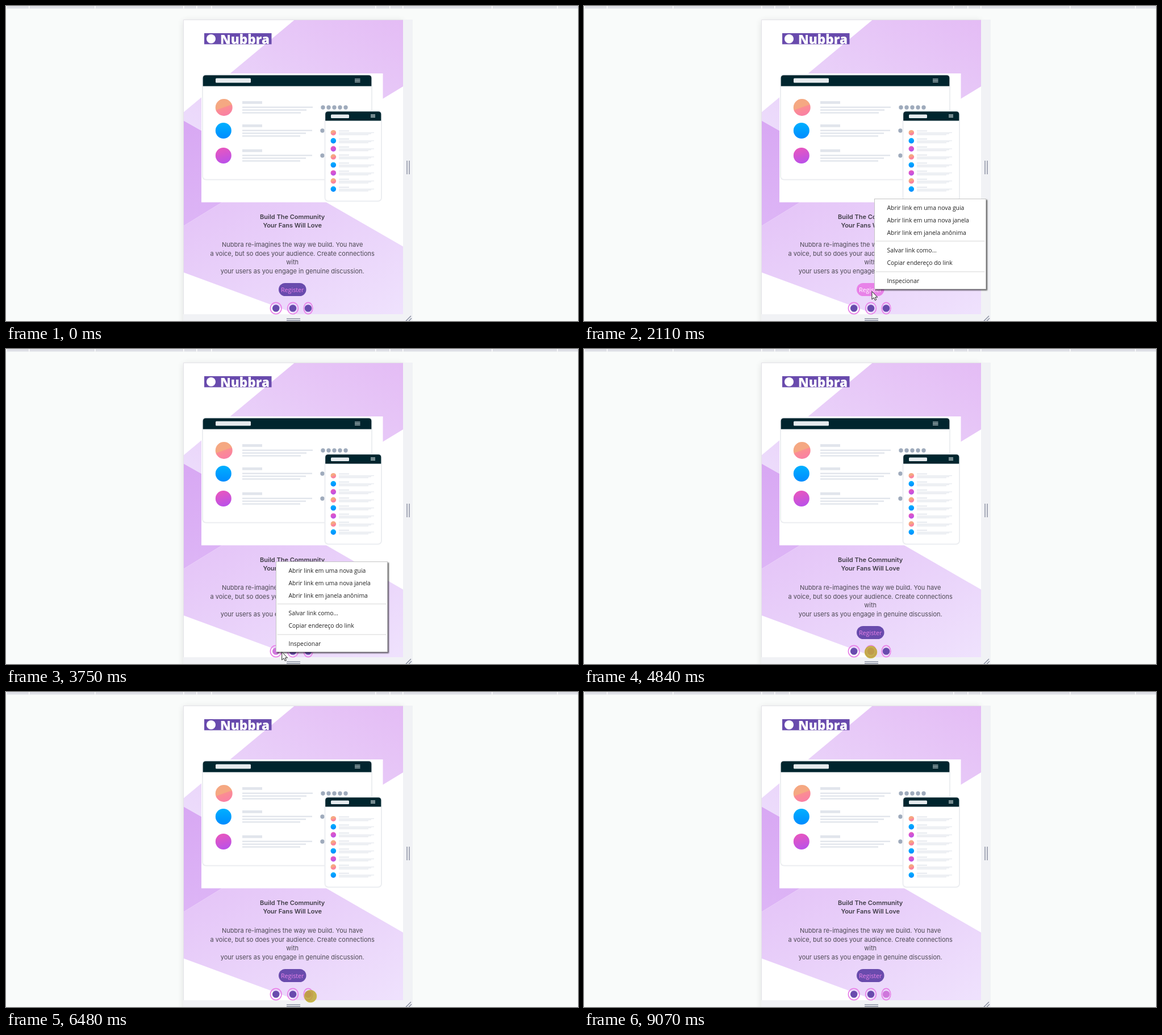
Write an HTML page that moves like this. It is 1007 by 556 pixels and loops after 9.27 s.

```html
<!DOCTYPE html>
<html lang="en">
<head>
<meta charset="utf-8">
<style>
  html, body { margin: 0; width: 100%; height: 100%; overflow: hidden; background: #f9fbfa; }
  svg { display: block; }
  .body { font: 11px Inter, sans-serif; fill: #4d4954; text-anchor: middle; }
  .bold { font-weight: 600; fill: #3f3c46; }
  .item { font: 10.4px "Open Sans", sans-serif; fill: #222; }
</style>
</head>
<body>
<svg width="1007" height="556" viewBox="0 0 1007 556">
  <defs>
    <linearGradient id="top" x1="0" y1="1" x2="1" y2="0"><stop stop-color="#eddffc"/><stop offset="1" stop-color="#e4bcf5"/></linearGradient>
    <linearGradient id="side" x1="0" y1="0" x2="0" y2="1"><stop stop-color="#d8a8f3"/><stop offset="1" stop-color="#ddb5f6"/></linearGradient>
    <linearGradient id="low" x1="0" y1="0" x2="1" y2="1"><stop stop-color="#e4c3f7"/><stop offset="1" stop-color="#efe2fd"/></linearGradient>
    <linearGradient id="orange" x1=".3" y1="0" x2=".65" y2="1"><stop offset=".48" stop-color="#f5a882"/><stop offset=".52" stop-color="#fb8d92"/><stop offset="1" stop-color="#f97fa6"/></linearGradient>
    <linearGradient id="blue" x2="0" y2="1"><stop stop-color="#00b0ff"/><stop offset="1" stop-color="#008cff"/></linearGradient>
    <linearGradient id="pink" x1=".3" y1="0" x2=".6" y2="1"><stop stop-color="#e957bd"/><stop offset="1" stop-color="#b951ea"/></linearGradient>
    <filter id="soft" x="-10%" y="-10%" width="120%" height="120%"><feGaussianBlur stdDeviation="6"/></filter>
    <filter id="drop" x="-5%" y="-5%" width="110%" height="110%"><feDropShadow dx="2" dy="2" stdDeviation="1" flood-opacity=".6"/></filter>
  </defs>

  <rect width="1007" height="556" fill="#f9fbfa"/>
  <g id="ruler"><rect width="1007" height="4.5" fill="#dedfe6"/></g>
  <rect x="312" y="26" width="387" height="540" opacity=".1" filter="url(#soft)"/>
  <rect x="312" y="24" width="404" height="532" fill="#f1f2f5"/>
  <rect x="312" y="24" width="387" height="520" fill="#fff"/>
  <path d="M706 273v24M710 273v24M494 552h24M494 555.3h24M704 556l9-9M709 556l5-5" stroke="#8d93a4" stroke-width="1.5"/>

  <path d="M312 188L508.500 24H699V142L520 251L344 220L312 202Z" fill="url(#top)"/>
  <path d="M312 202L480 297L381 346L312 388.500Z" fill="url(#side)"/>
  <path d="M312 388.500L381 346H563L699 424.500V544H512L312 470Z" fill="url(#low)"/>
  <path d="M312.500 24V544M312 24.500H699" stroke="#e4e2e8" fill="none"/>

  <rect x="349" y="48" width="118.500" height="19.500" fill="#694bad"/>
  <circle cx="361" cy="58" r="8" fill="#fff"/>
  <text x="377" y="66.700" font-family="Open Sans, sans-serif" font-weight="800" font-size="22.500" fill="#fff">Nubbra</text>

  <g id="art"><rect x="344" y="119" width="319.500" height="227.500" fill="#fff"/></g>

  <g class="body">
    <g class="bold"><text x="504.200" y="375.500">Build The Community</text><text x="504.200" y="391">Your Fans Will Love</text></g>
    <text x="504.200" y="425">Nubbra re-imagines the way we build. You have</text>
    <text x="504.200" y="440.500">a voice, but so does your audience. Create connections</text>
    <text x="504.200" y="456">with</text>
    <text x="504.200" y="471.500">your users as you engage in genuine discussion.</text>
  </g>

  <rect id="pill" x="480" y="489" width="48.500" height="23" rx="11.500"/>
  <text id="label" x="504.200" y="505" text-anchor="middle" font-family="Open Sans, sans-serif" font-size="10.700">Register</text>
  <rect id="tap" x="480" y="489" width="48.500" height="23" fill="#4aa3e6" opacity=".5"/>
  <g id="icons"></g>

  <g id="menu">
    <rect width="196" height="159" fill="#fff" stroke="#c4c4c4" filter="url(#drop)"/>
    <rect id="row" x="1" width="194" height="22" fill="#e8e8e8"/>
    <path d="M2 74.500H194M2 128.500H194" stroke="#d5d5d5"/>
  </g>

  <circle id="touch" r="10.800"/>
  <path id="arrow" d="M.5.5V14.500L3.800 11.500L6 16.200L8.200 15.200L6.100 10.700H10.300Z" fill="#fff" stroke="#222"/>
</svg>

<script>
const LOOP = 9270, PURPLE = [105, 75, 173], VIOLET = [232, 130, 232], WHITE = [255, 255, 255];
const $ = id => document.getElementById(id);
const add = (id, markup) => $(id).insertAdjacentHTML('beforeend', markup);
const rect = (x, y, w, h, fill, extra = '') => `<rect x="${x}" y="${y}" width="${w}" height="${h}" fill="${fill}" ${extra}/>`;
const dot = (x, y, r, fill) => `<circle cx="${x}" cy="${y}" r="${r}" fill="${fill}"/>`;
const SKINS = ['url(#orange)', 'url(#blue)', 'url(#pink)'];

for (const x of [0, 40, 156, 312, 335, 361, 650, 675, 698, 855, 970]) add('ruler', rect(x, 0, 1.5, 4.5, '#fff'));

// Rounded app window with a dark header inside its border, a title pill and a hamburger.
function appWindow(x, y, w, h, head, pill, burger) {
  const step = head / 8, edge = .7;
  return rect(x, y, w, h, '#fff', 'rx="6" stroke="#eceef1" stroke-width="2"') +
    `<path d="M${x + edge} ${y + head}V${y + 5 + edge}q0-5 5-5H${x + w - 5 - edge}q5 0 5 5V${y + head}Z" fill="#00252e"/>` +
    rect(...pill, '#e6ebee', 'rx="1.5"') +
    [-1, 0, 1].map(i => rect(burger[0], y + head / 2 + i * step - .5, burger[1], 1.1, '#dfe6e8')).join('');
}

add('art', appWindow(346, 121.5, 298, 185, 20, [369, 127.5, 62, 8], [614, 9.5]));
[179, 220, 264].forEach((y, i) => {
  add('art', dot(i ? 382.8 : 383.7, y, i ? 14 : 15, SKINS[i]) + rect(416, y - 11, 35, 4.8, '#e1e5ec') +
    [124, 113, 103].map((w, k) => rect(416, y - 1.5 + k * 4.9, w - (i ? 1 : 0), 2.4, '#e1e5ec')).join(''));
  for (let k = 0; k < (i ? 1 : 5); k++) add('art', dot((i ? 557 : 558) + k * 10, y, 3.7, '#9fabbc'));
});
add('art', appWindow(561.5, 185.5, 99.5, 159, 17, [572, 191.5, 32, 6.5], [642, 8]));
for (let i = 0; i < 8; i++) {
  const y = 223.7 + i * 14.2;
  add('art', dot(576.3, y, 4.8, SKINS[i % 3]) + rect(586, y - 4, 18, 1.6, '#e1e5ec') +
    [62, 57, 52].map((w, k) => rect(586, y - .5 + k * 1.8, w, .9, '#dde1e9')).join(''));
}

const icons = [
  { x: 475.2, rx: 9.8, on: [3270, 3340], off: [4360, 4570] },
  { x: 505, rx: 9.4, on: [4770, 4840], off: [5930, 6140] },
  { x: 532, rx: 7.8, on: [6410, 6480], off: [LOOP, LOOP + 1] },
];
for (const icon of icons) {
  add('icons', `<ellipse cx="${icon.x}" cy="533.5" rx="${icon.rx}" ry="10.2" fill="none" stroke="#e882e8" stroke-width="1.7"/>` +
    dot(icon.x, 533.5, 6.3, ''));
  icon.mark = $('icons').lastElementChild;
}

const items = [['Abrir link em uma nova guia', 16], ['Abrir link em uma nova janela', 38], ['Abrir link em janela anônima', 60],
  ['Salvar link como...', 91], ['Copiar endereço do link', 113], ['Inspecionar', 145]];
for (const [text, y] of items) add('menu', `<text class="item" x="22" y="${y + 3.7}">${text}</text>`);

// Opening time, closing time, and the pressed point at the menu's lower left corner.
const menus = [[2040, 2650, 511, 499], [3540, 4160, 475, 534], [5040, 5900, 505, 535], [6680, 9070, 536, 537]];
const presses = [[1090, 2040], [2650, 3540], [4360, 5040], [5900, 6680]];
const path = [[130, 797, 518], [400, 700, 486], [700, 585, 484], [1020, 510, 499], [1090, 511, 499], [2040, 511, 499],
  [2600, 475, 533], [3540, 475, 534], [4160, 505, 535], [5040, 505, 535], [5860, 536, 537], [6680, 536, 537],
  [7370, 723, 516], [7580, 792, 526], [8140, 958, 540]];

const within = (t, [a, b]) => t >= a && t < b;
const ramp = (t, [a, b]) => Math.min(1, Math.max(0, (t - a) / (b - a)));
const mix = (a, b, k) => `rgb(${a.map((v, i) => Math.round(v + (b[i] - v) * k))})`;
const hover = (t, on, off) => ramp(t, on) - ramp(t, off);
const show = (id, visible) => $(id).style.display = visible ? '' : 'none';
const place = (id, x, y) => $(id).setAttribute('transform', `translate(${x} ${y})`);

function pointer(t) {
  const i = Math.max(1, path.findIndex(p => p[0] > t));
  const [a, b] = t >= path.at(-1)[0] ? path.slice(-2) : [path[i - 1], path[i]];
  const k = ramp(t, [a[0], b[0]]);
  return [a[1] + (b[1] - a[1]) * k, a[2] + (b[2] - a[2]) * k];
}

function draw(t) {
  const glow = hover(t, [1300, 1500], [2920, 3060]);
  $('pill').setAttribute('fill', mix(PURPLE, VIOLET, glow));
  $('label').setAttribute('fill', mix(VIOLET, WHITE, glow));
  show('tap', within(t, [1290, 1700]));
  for (const { mark, on, off } of icons) mark.setAttribute('fill', mix(PURPLE, VIOLET, hover(t, on, off) * .8));

  const [x, y] = pointer(t);
  const menu = menus.find(m => within(t, m));
  show('menu', menu);
  if (menu) {
    const left = menu[2] + .5, top = menu[3] - 158.5;
    place('menu', left, top);
    const item = x >= left && x < left + 196 && items.find(([, c]) => Math.abs(y - top - c) < 11);
    show('row', item);
    if (item) $('row').setAttribute('y', item[1] - 11);
  }

  const visible = within(t, [130, 8210]);
  const touching = !menu && x > 312 && x < 699;
  const pressed = presses.some(p => within(t, p));
  show('touch', visible && touching);
  show('arrow', visible && !touching);
  place('touch', x, y);
  place('arrow', x, y);
  $('touch').setAttribute('fill', pressed ? 'rgba(186,164,38,.8)' : 'rgba(110,110,110,.4)');
  $('touch').setAttribute('stroke', pressed ? 'rgba(200,186,50,.7)' : 'rgba(90,90,90,.25)');
}

function frame() {
  draw(performance.now() % LOOP);
  requestAnimationFrame(frame);
}
frame();
</script>
</body>
</html>
```
